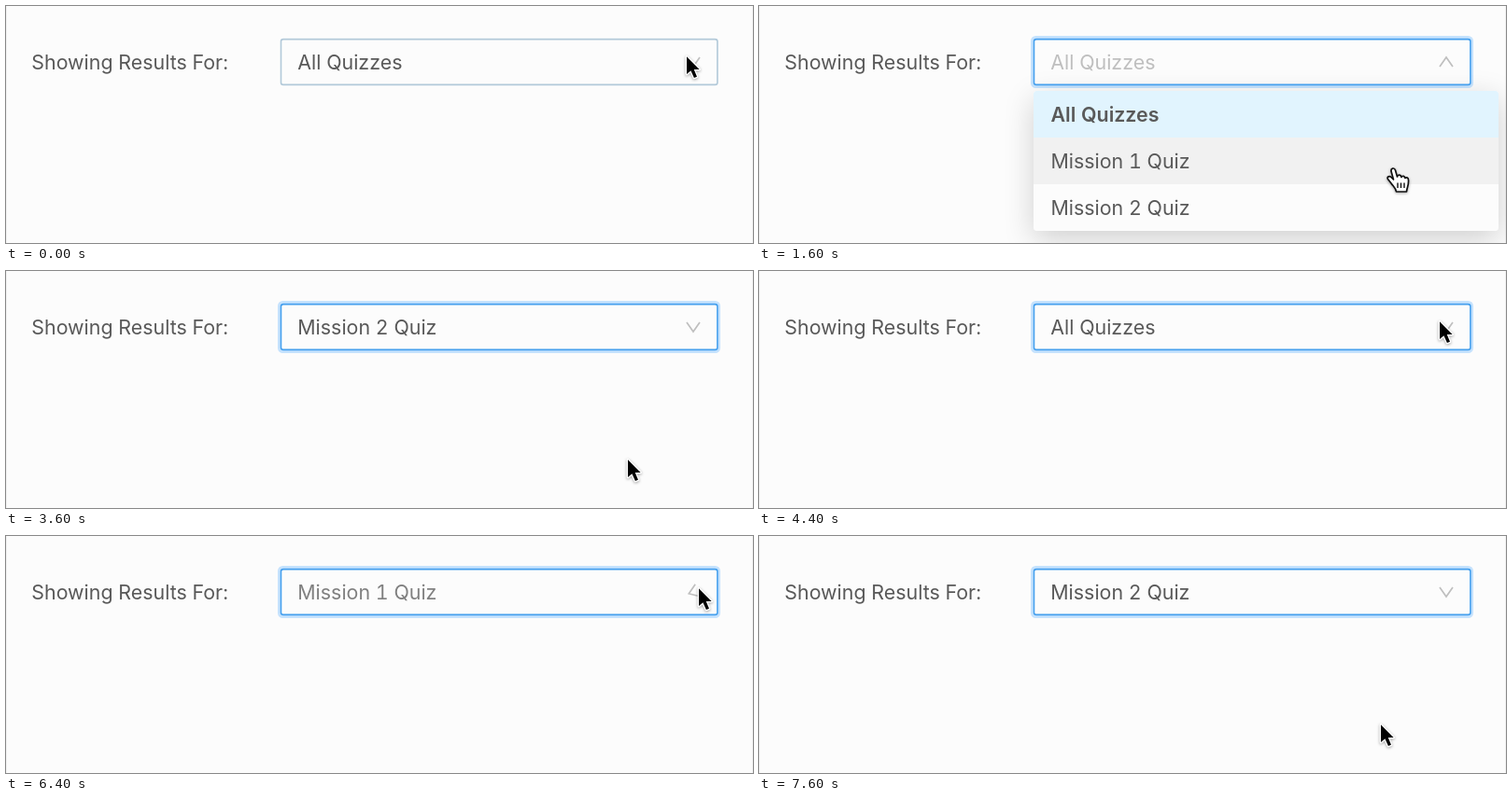
Write an HTML page that moves like this. It is 800x254 px and loops after 7700 ms.

```html
<!DOCTYPE html>
<html lang="en">
<head>
<meta charset="utf-8">
<style>
html, body { margin: 0; width: 100%; height: 100%; overflow: hidden; background: #fcfcfc; }
body { font: 21.4px/50px Inter, "Open Sans", sans-serif; font-variant-numeric: tabular-nums; color: #595959; }
body > *, .row { position: absolute; box-sizing: border-box; white-space: pre; }
#page { inset: 0; border: solid #efefef; border-width: 0 1px; }
#label { left: 27.3px; top: 35px; }
#value { left: 312.3px; top: 35px; }
#menu { left: 294px; top: 91px; width: 498px; height: 150px; background: #fcfcfc; border-radius: 4px;
  overflow: hidden; box-shadow: 0 9px 32px rgba(0,0,0,.18); transform-origin: 0 0; }
.row { left: 0; width: 100%; height: 50px; padding-left: 18.5px; }
svg { left: 0; top: 0; overflow: visible; }
</style>
</head>
<body>
<div id="page"></div>
<div id="label">Showing Results For:</div>
<div id="value"></div>
<div id="menu"></div>
<svg width="800" height="254" fill="none">
  <rect id="ring" x="292.5" y="33.5" width="471" height="53" rx="4" stroke="#1890ff" stroke-width="3"/>
  <rect id="border" x="294.5" y="35.6" width="467.4" height="48.8" rx="2.5" stroke-width="1.6"/>
  <path id="chevron" d="M-7-5 0 5 7-5" stroke="#bfbfbf" stroke-width="1.7"/>
  <g id="cursor" style="filter:drop-shadow(0 1.5px 1.5px rgba(0,0,0,.35))" stroke-linejoin="round">
    <path id="arrow" d="M0 0V21.5L5 17 9 26 12.5 24.5 8.8 15.7H15.5Z" transform="translate(1 2.2) scale(.88)"
      fill="#000" stroke="#fff" stroke-width="3" paint-order="stroke"/>
    <g id="hand" stroke="#111" stroke-width="1.7">
      <path d="M-3 16 -6.5 11.5C-8 9-4.5 7.5-2.5 10L-.5 12-3 3C-3.5-.5 .5-1 1.5 2L3.5 9C4 6.5 7.5 6.5 8 9.5 9 7.5 11.5 8 12 10.5 13.5 9 15.5 10 15.5 12.5 16 18 14 20 13.5 25H2.5C2 21-1 19-3 16Z" fill="#fff"/>
      <path d="M4 15.5V21M7.5 15.5V21M11 15.5V21" stroke-width="1.4"/>
    </g>
  </g>
</svg>
<script>
const $ = id => document.getElementById(id);
const names = ['All Quizzes', 'Mission 1 Quiz', 'Mission 2 Quiz'];
const rows = names.map((name, i) => {
  const row = document.createElement('div');
  row.className = 'row';
  row.textContent = name;
  row.style.top = i * 50 + 'px';
  $('menu').append(row);
  return row;
});

const ramp = (t, start, length) => Math.min(1, Math.max(0, (t - start) / length));
const mix = (a, b, p) => a + (b - a) * p;
const rgb = (a, b, p) => `rgb(${a.map((v, i) => mix(v, b[i], p))})`;

const picks = [1650, 3250];                       // clicks on a menu row
const opens = [700, 2300];                        // clicks on the field
const hovers = [Infinity, 1150, 2900];
const moves = [[800, 1400, 680, 174], [1700, 2300, 741, 54], [2500, 3000, 665, 200]];

function draw(t) {
  const chosen = picks.filter(p => t >= p).length;
  let fade = 0, shown = 0, scale = 1;
  opens.forEach((open, i) => {
    fade += ramp(t, open, 260) - ramp(t, picks[i], 260);
    const enter = 1 - (1 - ramp(t, open + 100, 200)) ** 5;
    const leave = ramp(t, picks[i], 200) ** 3;
    if (enter > 0 && leave < 1) {
      shown = enter - leave;
      scale = .8 + .2 * shown;
    }
  });

  const focus = ramp(t, 0, 400);
  $('border').style.stroke = rgb([178, 201, 217], [70, 160, 238], focus);
  $('ring').style.opacity = .24 * focus;
  $('value').textContent = names[chosen];
  $('value').style.color = rgb([89, 89, 89], [191, 191, 191], fade);
  $('chevron').setAttribute('transform', `translate(736 60) rotate(${180 * fade})`);

  $('menu').style.opacity = shown;
  $('menu').style.transform = `scaleY(${scale})`;
  rows.forEach((row, i) => {
    const on = i === chosen;
    row.style.fontWeight = on ? 600 : 400;
    row.style.background = on ? '#e1f4fe' : rgb([252, 252, 252], [241, 241, 241], ramp(t, hovers[i], 250));
  });

  let x = 728, y = 52;
  for (const [start, end, toX, toY] of moves) {
    const p = ramp(t, start, end - start), e = p * p * (3 - 2 * p);
    x = mix(x, toX, e);
    y = mix(y, toY, e);
  }
  const pointing = shown > 0 && y > 91;
  $('cursor').setAttribute('transform', `translate(${x} ${y})`);
  $('hand').style.display = pointing ? '' : 'none';
  $('arrow').style.display = pointing ? 'none' : '';
}

// The scene plays twice at ten pictures a second, resting after the first pass.
function tick() {
  const t = Math.floor(performance.now() % 7700 / 100) * 100;
  draw(t < 4100 ? Math.min(t, 3600) : t - 4000);
  requestAnimationFrame(tick);
}
tick();
</script>
</body>
</html>
```
